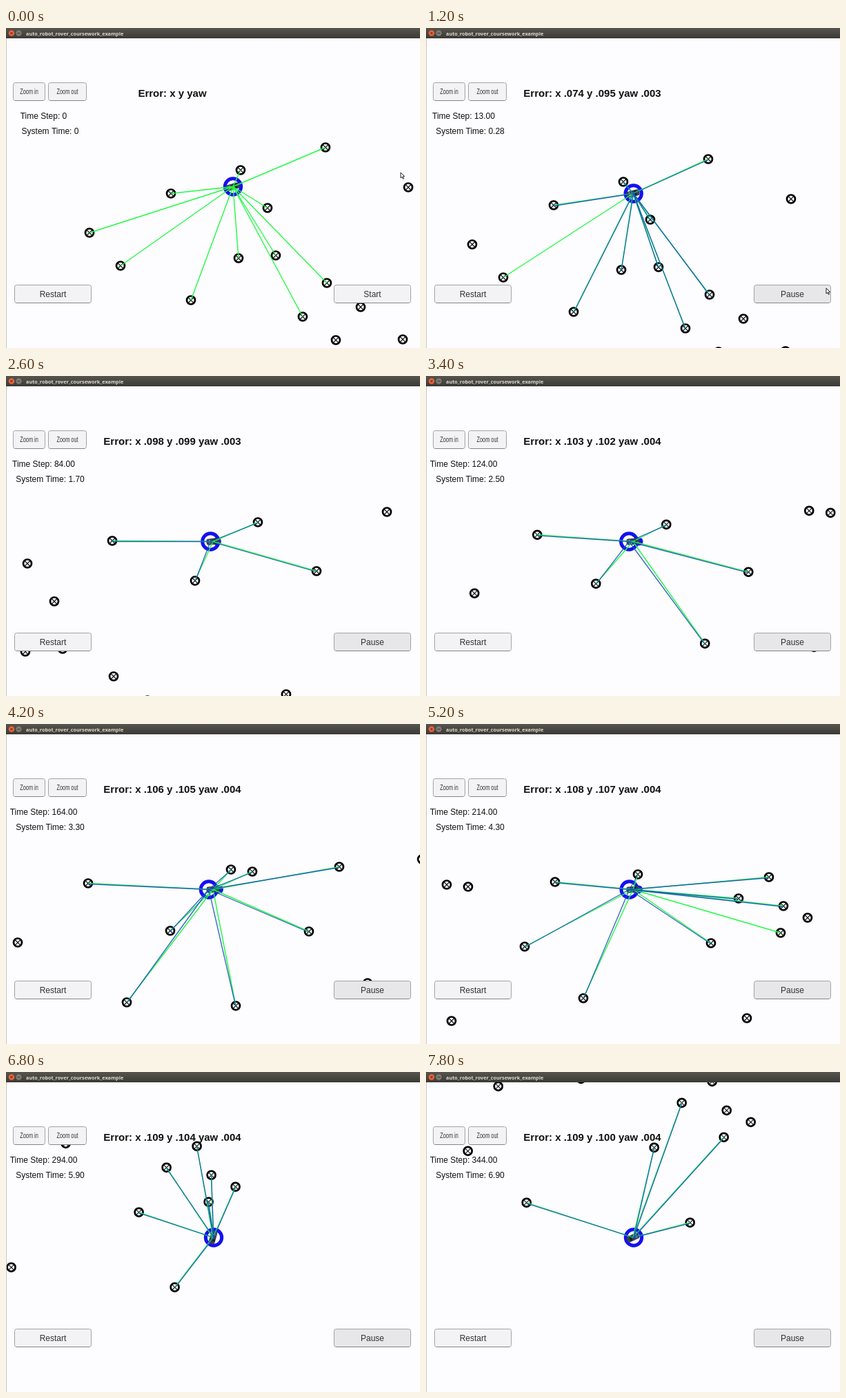
An HTML page with a canvas for the animation above (8 s loop, 600x465 px).

```html
<!DOCTYPE html>
<html>
<head>
<meta charset="utf-8">
<style>
  html, body { margin: 0; width: 100%; height: 100%; overflow: hidden; background: #fdfcfe; }
  canvas { display: block; }
</style>
</head>
<body>
<canvas id="stage" width="600" height="465"></canvas>
<script>
const ctx = document.getElementById('stage').getContext('2d');
const LOOP = 8000, TICK = 200, START = 1000;
const RANGE = 226, MATCH_RANGE = 222;
const SANS = '"Liberation Sans", Arial, sans-serif';
const BLUE = '#1410f0';

// The map: landmark positions along the road
const landmarks = [
  [463, 173], [340, 206], [239, 240], [379, 261], [121, 297], [166, 345], [337, 334],
  [391, 330], [465, 370], [268, 395], [514, 405], [430, 419], [478, 453], [575, 452],
  [583, 231], [674, 146], [759, 217], [861, 131], [715, 396], [980, 200], [1068, 111],
  [1099, 114], [1225, 107], [1181, 201], [1075, 309], [917, 304], [1266, 276], [1345, 96],
  [1451, 196], [1491, 131], [1535, 100], [1556, 142], [1552, 181], [1591, 159], [1503, 305]
];

// Key points of the drive: step, then camera shift
const route = [
  [0, -29, 10], [13, -54, 17], [84, -309, 66], [164, -742, 100],
  [214, -1038, 122], [234, -1139, 128], [294, -1258.4, 7.3], [344, -1120.3, -86.7]
];

function slope(i, d) {
  const rate = j => (route[j + 1][d] - route[j][d]) / (route[j + 1][0] - route[j][0]);
  const last = route.length - 1;
  if (i === 0) return 1.5 * rate(0) - .5 * slope(1, d);
  if (i === last) return 1.5 * rate(last - 1) - .5 * slope(last - 1, d);
  const before = route[i][0] - route[i - 1][0], after = route[i + 1][0] - route[i][0];
  return (rate(i - 1) * after + rate(i) * before) / (before + after);
}

// Smooth curve through the key points
function shift(s, d) {
  let i = 0;
  while (i < route.length - 2 && s > route[i + 1][0]) i++;
  const a = route[i], b = route[i + 1], h = b[0] - a[0], u = (s - a[0]) / h, w = 1 - u;
  return w * w * (1 + 2 * u) * a[d] + u * u * (3 - 2 * u) * b[d]
    + h * u * w * (w * slope(i, d) - u * slope(i + 1, d));
}

function text(str, x, y, font, color = '#111', align = 'center', squeeze = 1) {
  ctx.save();
  ctx.translate(x, y);
  ctx.scale(squeeze, 1);
  ctx.font = font;
  ctx.fillStyle = color;
  ctx.textAlign = align;
  ctx.fillText(str, 0, 0);
  ctx.restore();
}

function line(x1, y1, x2, y2, color, width) {
  ctx.strokeStyle = color;
  ctx.lineWidth = width;
  ctx.beginPath();
  ctx.moveTo(x1, y1);
  ctx.lineTo(x2, y2);
  ctx.stroke();
}

function disc(x, y, r, color) {
  ctx.fillStyle = color;
  ctx.beginPath();
  ctx.arc(x, y, r, 0, 7);
  ctx.fill();
}

function ring(x, y, r, color, width) {
  ctx.strokeStyle = color;
  ctx.lineWidth = width;
  ctx.beginPath();
  ctx.arc(x, y, r, 0, 7);
  ctx.stroke();
}

function button(label, x, y, w, size, squeeze, fill = '#f3f2f4') {
  ctx.fillStyle = fill;
  ctx.strokeStyle = '#a3a2a4';
  ctx.lineWidth = 1;
  ctx.beginPath();
  ctx.roundRect(x + .5, y + .5, w - 1, 26, 3);
  ctx.fill();
  ctx.stroke();
  line(x + 3, y + 26.5, x + w - 3, y + 26.5, '#858486', 1);
  text(label, x + w / 2, y + 13.5 + size * .35, size + 'px ' + SANS, '#333', 'center', squeeze);
}

function landmark(x, y) {
  ring(x, y, 6, '#000', 2.7);
  line(x - 4, y - 4, x + 4, y + 4, '#111', 1.1);
  line(x - 4, y + 4, x + 4, y - 4, '#111', 1.1);
}

function car(x, y, heading) {
  ctx.save();
  ctx.translate(x, y);
  ctx.rotate(heading);
  ctx.fillStyle = '#39414e';
  ctx.beginPath();
  ctx.roundRect(-9.5, -4.5, 19, 9, 3);
  ctx.fill();
  ctx.fillStyle = '#8a919b';
  ctx.fillRect(-6, -3, 2, 6);
  ctx.fillStyle = '#171b22';
  ctx.fillRect(2, -3.5, 3, 7);
  ctx.restore();
}

function world(step, running) {
  let dx = 0, dy = 0, cx = 329, cy = 230, vx = 2, heading = -.27;
  if (running) {
    dx = shift(step, 1);
    dy = shift(step, 2);
    vx = shift(step - 1, 1) - dx;
    heading = Math.atan2(shift(step - 1, 2) - dy, vx);
    cx = 300;
    cy = 240;
  }
  // The estimate falls behind as the car speeds up
  const lead = Math.max(0, vx - 2);
  const ex = running ? 301 - lead * 1.9 : cx;
  const spots = landmarks.map(([x, y]) => {
    const sx = x + dx, sy = y + dy;
    return { x: sx, y: sy, dist: Math.hypot(sx - cx, sy - cy) };
  });

  ctx.save();
  ctx.translate(0, .5);
  spots.forEach(p => landmark(p.x, p.y));
  ring(ex, cy, 11.7, BLUE, 5);
  if (lead > 1) disc(300 + lead * 2.4, cy, 6, BLUE);
  car(cx, cy, heading);
  spots.filter(p => p.dist < RANGE)
    .forEach(p => line(cx, cy, p.x, p.y, '#22fa46', 1.4));
  spots.filter(p => running && p.dist < MATCH_RANGE)
    .forEach(p => line(ex, cy, p.x, p.y + 1, 'rgba(20,80,190,.88)', 1.3));
  ctx.restore();
}

function titleBar() {
  const shade = ctx.createLinearGradient(0, 0, 0, 15);
  shade.addColorStop(0, '#57554e');
  shade.addColorStop(1, '#3b3a36');
  ctx.fillStyle = shade;
  ctx.fillRect(0, 0, 600, 15);
  disc(8, 7.5, 4.3, '#e9633c');
  line(6.5, 6, 9.5, 9, '#5a2412', 1);
  line(6.5, 9, 9.5, 6, '#5a2412', 1);
  disc(18.5, 7.5, 4.2, '#7d7a72');
  line(16.5, 7.5, 20.5, 7.5, '#3b3a36', 1);
  text('auto_robot_rover_coursework_example', 29, 10.5, 'bold 7.25px "Open Sans", sans-serif', '#dfdbd2', 'left');
}

// Moves down to the button, then slides right and leaves
function cursor(t) {
  if (t > 1200) return;
  const down = Math.min(1, t / 600), right = Math.max(0, (t - 800) / 400);
  ctx.save();
  ctx.translate(572 - 12 * down + 20 * right, 210 + 176 * down - 8 * right);
  ctx.fillStyle = '#fff';
  ctx.strokeStyle = '#222';
  ctx.lineWidth = 1;
  const arrow = new Path2D('M0 0V8L2 6.3 3.4 9.3 4.6 8.7 3.3 5.8 5.6 5.6Z');
  ctx.fill(arrow);
  ctx.stroke(arrow);
  ctx.restore();
}

// Errors in thousandths
function errorText(step, running) {
  const show = v => running ? ' .' + String(Math.round(v)).padStart(3, '0') : '';
  const x = show(109 - 43.5 * Math.exp(-step / 60));
  const y = show(101 - 6 * Math.cos(step / 70));
  const yaw = show(step < 100 ? 3 : 4);
  return `Error: x${x} y${y} yaw${yaw}`;
}

function draw(t) {
  const running = t >= START;
  const step = running ? Math.round((t - (t < 1400 ? 940 : 920)) / 20) : 0;

  ctx.fillStyle = '#fdfcfe';
  ctx.fillRect(0, 0, 600, 465);
  world(step, running);
  line(.5, 15, .5, 465, '#c4c3c5', 1);
  titleBar();

  button('Zoom in', 10, 79, 47, 10.5, .7);
  button('Zoom out', 61, 79, 56, 10.5, .7);
  button('Restart', 12, 373, 112, 12, 1);
  button(running ? 'Pause' : 'Start', 475, 373, 112, 12, 1, running ? '#e7e6e8' : undefined);

  text(errorText(step, running), 241, 100, 'bold 15px ' + SANS);
  text('Time Step: ' + (running ? step.toFixed(2) : 0), 54.5, 131.5, '12px ' + SANS);
  text('System Time: ' + (running ? (step / 50 + .02).toFixed(2) : 0), 64, 153.7, '12px ' + SANS);
  cursor(t);
}

const begin = performance.now();
function frame() {
  const t = (performance.now() - begin) % LOOP;
  draw(Math.floor(t / TICK) * TICK);
  requestAnimationFrame(frame);
}
frame();
</script>
</body>
</html>
```
